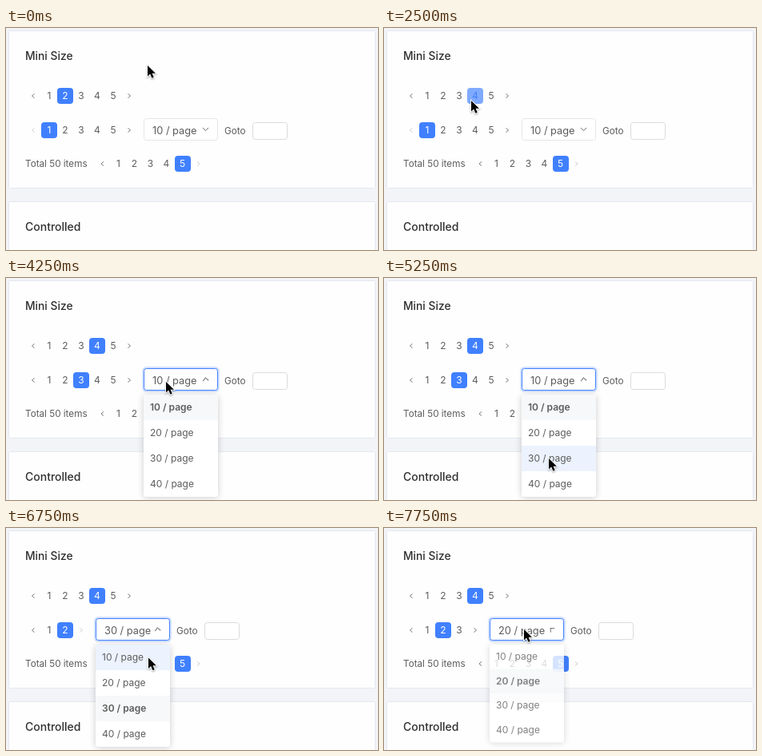
An HTML page with a canvas that plays this animation: 465 by 278 pixels, repeating every 8 s.

```html
<!DOCTYPE html>
<html lang="en">
<head>
<meta charset="utf-8">
<title>Pagination</title>
<style>
html, body { margin: 0; width: 465px; height: 278px; overflow: hidden; }
canvas { display: block; }
</style>
</head>
<body>
<canvas id="stage" width="465" height="278"></canvas>
<script>
const ctx = document.getElementById('stage').getContext('2d');
const LOOP = 8000, STEP = 250;
const BLUE = '#4080ff', TEXT = '#5c5c5c', DARK = '#303030', PALE = '#cfcfcf', ARROW = '#757575';
const SIZES = [10, 20, 30, 40];

// Pointer tip: time, x, y
const POINTER = [
  [0, 177, 47], [1250, 89, 87], [1750, 89, 87], [2250, 109, 91], [2500, 109, 91],
  [3250, 89, 133], [3500, 89, 133], [4000, 200, 130], [4250, 200, 130],
  [5000, 206, 226], [5250, 206, 226], [6000, 181, 139], [6250, 178, 133],
  [6500, 178, 133], [7000, 178, 192], [7250, 176, 150], [7500, 176, 132], [7750, 175, 127]
];
// Pages picked: time, page
const FIRST_PICKS = [[-1000, 2], [1525, 3], [2300, 4]];
const SECOND_PICKS = [[-1000, 1], [3410, 3], [5300, 2]];
const SIZE_PICKS = [[-1000, 10], [5300, 30], [7050, 20]];
// Dropdown: opens, closes
const MENUS = [[3850, 5300], [6350, 7050], [7594, 9000]];

const clamp = v => Math.max(0, Math.min(1, v));
const latest = (list, t) => list.filter(item => item[0] <= t).pop();

function pointerAt(t) {
  const i = POINTER.findIndex(p => p[0] > t);
  if (i < 0) return POINTER[POINTER.length - 1].slice(1);
  const [t0, x0, y0] = POINTER[i - 1], [t1, x1, y1] = POINTER[i];
  const u = (t - t0) / (t1 - t0), k = u * u * (3 - 2 * u);
  return [x0 + (x1 - x0) * k, y0 + (y1 - y0) * k];
}

function menuOpenness(t) {
  for (const [open, close] of MENUS)
    if (t >= open && t < close + 150) return clamp(Math.min((t - open) / 200, 1 - (t - close) / 150));
  return 0;
}

function text(str, x, midY, size, color = TEXT, weight = 400, align = 'left') {
  ctx.font = `${weight} ${size}px Inter, sans-serif`;
  ctx.textAlign = align;
  ctx.fillStyle = color;
  ctx.fillText(str, x, Math.round(midY + size * 0.36));
}

function box(x, y, w, h, r, fill, stroke, line = 1) {
  ctx.beginPath();
  ctx.roundRect(x, y, w, h, r);
  if (fill) { ctx.fillStyle = fill; ctx.fill(); }
  if (stroke) { ctx.strokeStyle = stroke; ctx.lineWidth = line; ctx.stroke(); }
}

// A "v" mark turned clockwise by the given angle
function chevron(x, y, angle, w, h, color) {
  ctx.save();
  ctx.translate(x, y);
  ctx.rotate(angle);
  ctx.beginPath();
  ctx.moveTo(-w, -h);
  ctx.lineTo(0, h);
  ctx.lineTo(w, -h);
  ctx.strokeStyle = color;
  ctx.stroke();
  ctx.restore();
}

function pager(x, y, count, page, fade, hover, backOff = page === 1) {
  ctx.lineWidth = 1;
  chevron(x, y, Math.PI / 2, 2.6, 1.5, backOff ? PALE : ARROW);
  chevron(x + 20 * (count + 1), y, -Math.PI / 2, 2.6, 1.5, page === count ? PALE : ARROW);
  for (let n = 1; n <= count; n++) {
    const cx = x + 20 * n, active = n === page;
    if (active) {
      ctx.globalAlpha = fade;
      box(Math.round(cx) - 10, y - 10, 20, 20, 4, BLUE);
      ctx.globalAlpha = 1;
    }
    const color = active ? (fade < 1 ? BLUE : '#fff') : n === hover ? BLUE : TEXT;
    text(n, cx, y, 12, color, 400, 'center');
  }
}

// Shadow around the menu only, so that a fading menu stays white inside
function menuShadow() {
  ctx.save();
  ctx.beginPath();
  ctx.rect(-20, -20, 133, 168);
  ctx.roundRect(0, 0, 93, 128, 4);
  ctx.clip('evenodd');
  ctx.shadowColor = 'rgba(0,0,0,.2)';
  ctx.shadowBlur = 8;
  ctx.shadowOffsetY = 1;
  box(0, 0, 93, 128, 4, '#fff');
  ctx.restore();
}

function menu(x, openness, size, py) {
  ctx.save();
  ctx.globalAlpha = openness;
  ctx.translate(x, 146);
  ctx.scale(1, 0.8 + 0.2 * openness);
  menuShadow();
  box(0, 0, 93, 128, 4, '#fff');
  SIZES.forEach((s, i) => {
    const top = 32 * i, chosen = s === size, hovered = py - 146 >= top && py - 146 < top + 32;
    if (chosen || hovered) box(0, top, 93, 32, i ? 0 : [4, 4, 0, 0], chosen ? '#f7f8fa' : '#ecf3ff');
    text(`${s} / page`, 8, top + 16, 12, TEXT, chosen ? 600 : 400);
  });
  ctx.restore();
}

function pointer(x, y) {
  ctx.save();
  ctx.translate(x, y);
  ctx.scale(0.9, 0.9);
  ctx.beginPath();
  [[0, 0], [0, 15], [3.5, 11.8], [6, 17.5], [8.6, 16.4], [6.2, 10.9], [11, 10.8]]
    .forEach(([px, py]) => ctx.lineTo(px, py));
  ctx.closePath();
  ctx.shadowColor = 'rgba(0,0,0,.35)';
  ctx.shadowBlur = 2;
  ctx.shadowOffsetY = 1;
  ctx.strokeStyle = '#fff';
  ctx.lineWidth = 2;
  ctx.stroke();
  ctx.shadowColor = 'transparent';
  ctx.fillStyle = '#000';
  ctx.fill();
  ctx.restore();
}

function draw(t) {
  const [px, py] = pointerAt(t);
  const hoverIn = (y, count) => Math.abs(py - y) <= 10 && px < 44 + 20 * count ? Math.round((px - 34) / 20) : 0;
  const [firstTime, firstPage] = latest(FIRST_PICKS, t);
  const [secondTime, secondPage] = latest(SECOND_PICKS, t);
  const size = latest(SIZE_PICKS, t)[1];
  const count = Math.ceil(50 / size);
  const open = menuOpenness(t);
  const secondFade = clamp((t - secondTime) / 300);

  ctx.fillStyle = '#f2f4f8';
  ctx.fillRect(0, 0, 465, 278);
  box(3.5, 3.5, 458, 197, 1, '#fefefe', '#e5e9f0');
  box(3.5, 217.5, 458, 80, 1, '#fefefe', '#e5e9f0');
  text('Mini Size', 24, 35, 13.8, DARK, 500);
  text('Controlled', 24, 249, 14, DARK, 500);

  pager(34, 85, 5, firstPage, clamp((t - firstTime) / 300), hoverIn(85, 5));
  pager(34, 128, count, secondPage, secondFade, hoverIn(128, count), t < SECOND_PICKS[1][0] + 300);
  text('Total 50 items', 24, 170, 11.7);
  pager(120.5, 170, 5, 5, 1, 0);

  const left = 72 + 20 * count, focused = t >= 3850;
  if (focused) box(left - 0.5, 112.5, 94, 29, 4, null, 'rgba(64,128,255,.22)', 3);
  box(left + 0.5, 113.5, 92, 27, 3, '#fff', t >= 3750 ? BLUE : '#e4e6ea');
  text(`${size} / page`, left + 11, 128.5, 12.8);
  ctx.lineWidth = 1;
  chevron(left + 77.5, 126.8, Math.PI * clamp(open * 0.96), 3.5, 1.9, ARROW);
  text('Goto', left + 101, 128.5, 11.7);
  box(left + 136.5, 118.5, 43, 21, 3, '#fff', '#d9dbdf');

  if (open > 0) menu(left, open, size, py);
  pointer(px, py);
}

function tick(now) {
  draw(Math.floor(now % LOOP / STEP) * STEP);
  requestAnimationFrame(tick);
}
requestAnimationFrame(tick);
</script>
</body>
</html>
```
